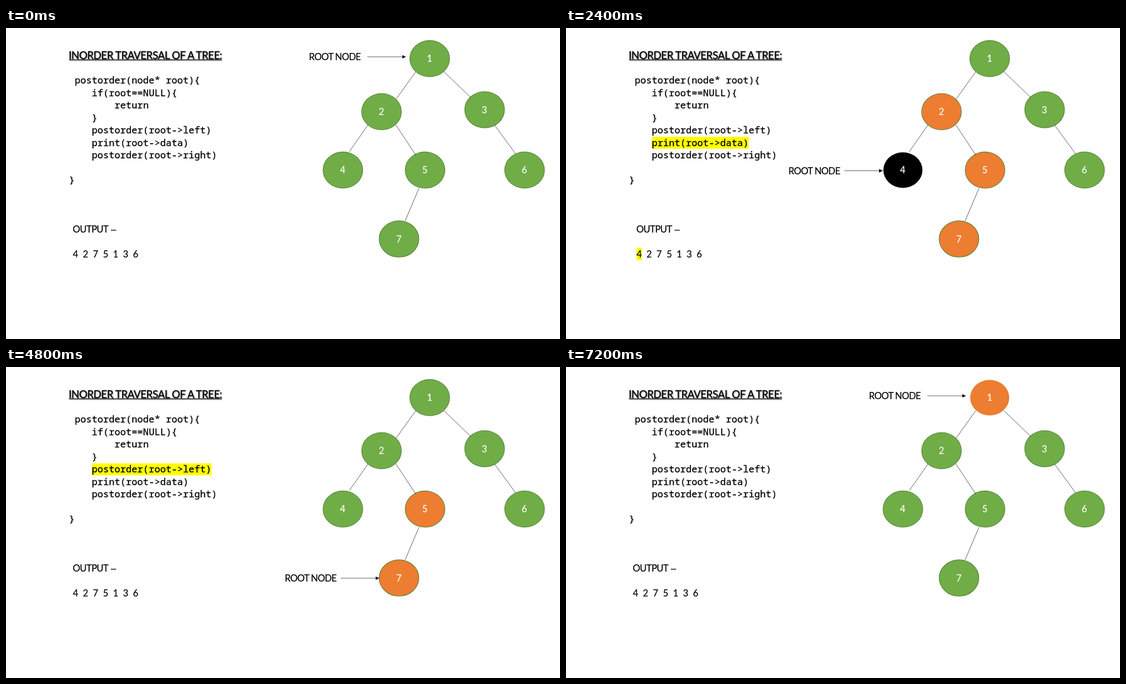
Animation of 998 by 561 pixels, one loop 8 s. Source, as an HTML page:

```html
<!DOCTYPE html>
<html lang="en">
<head>
<meta charset="utf-8">
<title>Tree traversal</title>
<style>
  html, body { margin: 0; width: 100%; height: 100%; overflow: hidden; background: #fff; }
  svg { display: block; width: 998px; height: 561px; }
  text { font: 16.7px Lato, sans-serif; letter-spacing: -.62px; stroke: #000; stroke-width: .2px; }
  .title { filter: drop-shadow(1.4px 1.4px .8px rgba(0, 0, 0, .45)); }
  .title text { font-size: 18.7px; letter-spacing: -.41px; stroke-width: .3px; }
  .code text { font: 17.12px "Noto Sans Mono", monospace; letter-spacing: 0; stroke-width: .3px; }
  .mid text { font-size: 16.6px; text-anchor: middle; letter-spacing: 0; }
  .dash { font-family: "Liberation Sans", sans-serif; }
  #nodes text { fill: #fff; stroke: #fff; }
  line { stroke: #000; stroke-width: .65px; }
  .mark { fill: #ff0; }
</style>
</head>
<body>
<svg viewBox="0 0 998 561">
  <defs>
    <marker id="head" markerUnits="userSpaceOnUse" markerWidth="7" markerHeight="7" refX="6.5" refY="3.5" orient="auto">
      <path d="M0 .2L6.8 3.5L0 6.8z"/>
    </marker>
  </defs>
  <rect width="998" height="561" fill="#fff"/>
  <rect id="codeMark" class="mark" height="21.5"/>
  <g class="title">
    <text x="113" y="55.6">INORDER TRAVERSAL OF A TREE:</text>
    <rect x="113.5" y="56.8" width="275" height="1.3"/>
  </g>
  <g id="code" class="code"></g>
  <g id="output">
    <rect id="digitMark" class="mark" y="396.5" width="9.6" height="22.5"/>
    <text x="120.3" y="369.2">OUTPUT<tspan class="dash" x="189">–</tspan></text>
    <g id="digits" class="mid"></g>
  </g>
  <g id="nodes" class="mid"></g>
  <g id="edges"></g>
  <text id="label">ROOT NODE</text>
  <line id="arrow" marker-end="url(#head)"/>
</svg>
<script>
const STEP = 800, CHAR = 10.27, LEFT = 113.4, ROW = 22.5;
const $ = id => document.getElementById(id);

function set(el, attrs) {
  for (const k in attrs) el.setAttribute(k, attrs[k]);
  return el;
}
function add(parent, tag, attrs, text) {
  const el = set(document.createElementNS("http://www.w3.org/2000/svg", tag), attrs);
  if (text) el.textContent = text;
  return parent.appendChild(el);
}

// Code lines: row, indent in characters, text
const code = [
  [0, 1, "postorder(node* root){"],
  [1, 4, "if(root==NULL){"],
  [2, 8, "return"],
  [3, 4, "}"],
  [4, 4, "postorder(root->left)"],
  [5, 4, "print(root->data)"],
  [6, 4, "postorder(root->right)"],
  [8, 0, "}"]
];
for (const [row, col, text] of code)
  add($("code"), "text", { x: LEFT + col * CHAR, y: 100.4 + row * ROW }, text);

[..."4275136"].forEach((d, i) =>
  add($("digits"), "text", { x: 125.3 + i * 18.05, y: 414 }, d));

const centers = [[763.3, 55.3], [676.5, 151], [862.2, 147.4], [606.9, 256.3],
                 [754.9, 256.3], [934.2, 256.2], [708, 380.6]];
const nodes = centers.map(([cx, cy], i) => {
  const el = add($("nodes"), "ellipse", { cx, cy });
  add($("nodes"), "text", { x: cx - .3, y: cy + 6.1 }, String(i + 1));
  return el;
});

const edges = [[738, 79, 703, 128], [789, 79, 837, 125], [652, 175, 618.5, 223],
               [702.5, 175, 738, 229], [880, 175, 918, 227], [744, 289, 719, 348]];
for (const [x1, y1, x2, y2] of edges) add($("edges"), "line", { x1, y1, x2, y2 });

// Node looks: green, orange, plain orange (no outline), black
const fills = { g: "#70ad47", o: "#ed7d31", p: "#ed7d31", k: "#000" };

// Pointers: label x, label baseline, arrow from and to
const flat = (x, y, ax, ay) => [x, y, ax, ay, ax + 69, ay];
const top1 = flat(545.8, 58, 651, 52);
const at2 = flat(477.5, 153.7, 571, 148);
const at2b = flat(474.7, 152.7, 571, 148);
const at4 = flat(400.7, 263.7, 501.5, 257.5);
const at7 = flat(502.3, 386.9, 603, 381);
const at5 = [760, 345.9, 791, 326, 772.5, 284.3];

// Steps: node looks, pointer, marked row, marked digit, mark indent, output shift
const steps = [
  ["ggggggg", top1],
  ["gpgppgp", at2, 4],
  ["gpgppgp", at4, 4],
  ["gogkogo", at4, 5, 0, 4, 6.5],
  ["gkggogo", at2b, 5, 1],
  ["ggggogo", at5, 6],
  ["ggggogo", at7, 4],
  ["ggggogk", at7, 5, 2],
  ["ggggkgg", at5, 5, 3, 0],
  ["pgggggg", top1]
];

function show([looks, [x, y, x1, y1, x2, y2], row, digit, indent = 4, shift = 0]) {
  nodes.forEach((el, i) => {
    const look = looks[i], lined = look === "g" || look === "o";
    set(el, {
      fill: fills[look],
      stroke: lined ? "#548235" : "none",
      "stroke-width": 1.1,
      rx: lined ? 35.8 : 35.2,
      ry: lined ? 32.7 : 32.1
    });
  });
  set($("label"), { x, y });
  set($("arrow"), { x1, y1, x2, y2 });
  const line = code[row];
  set($("codeMark"), line ? {
    x: LEFT + indent * CHAR,
    y: 83.8 + row * ROW,
    width: (line[1] + line[2].length - indent) * CHAR
  } : { width: 0 });
  set($("digitMark"), digit === undefined
    ? { width: 0 }
    : { x: 120.5 + digit * 18.05, width: 9.6 });
  set($("output"), { transform: `translate(${shift} 0)` });
}

let last = -1;
function tick() {
  const i = Math.floor(performance.now() / STEP) % steps.length;
  if (i !== last) show(steps[last = i]);
  requestAnimationFrame(tick);
}
tick();
</script>
</body>
</html>
```
